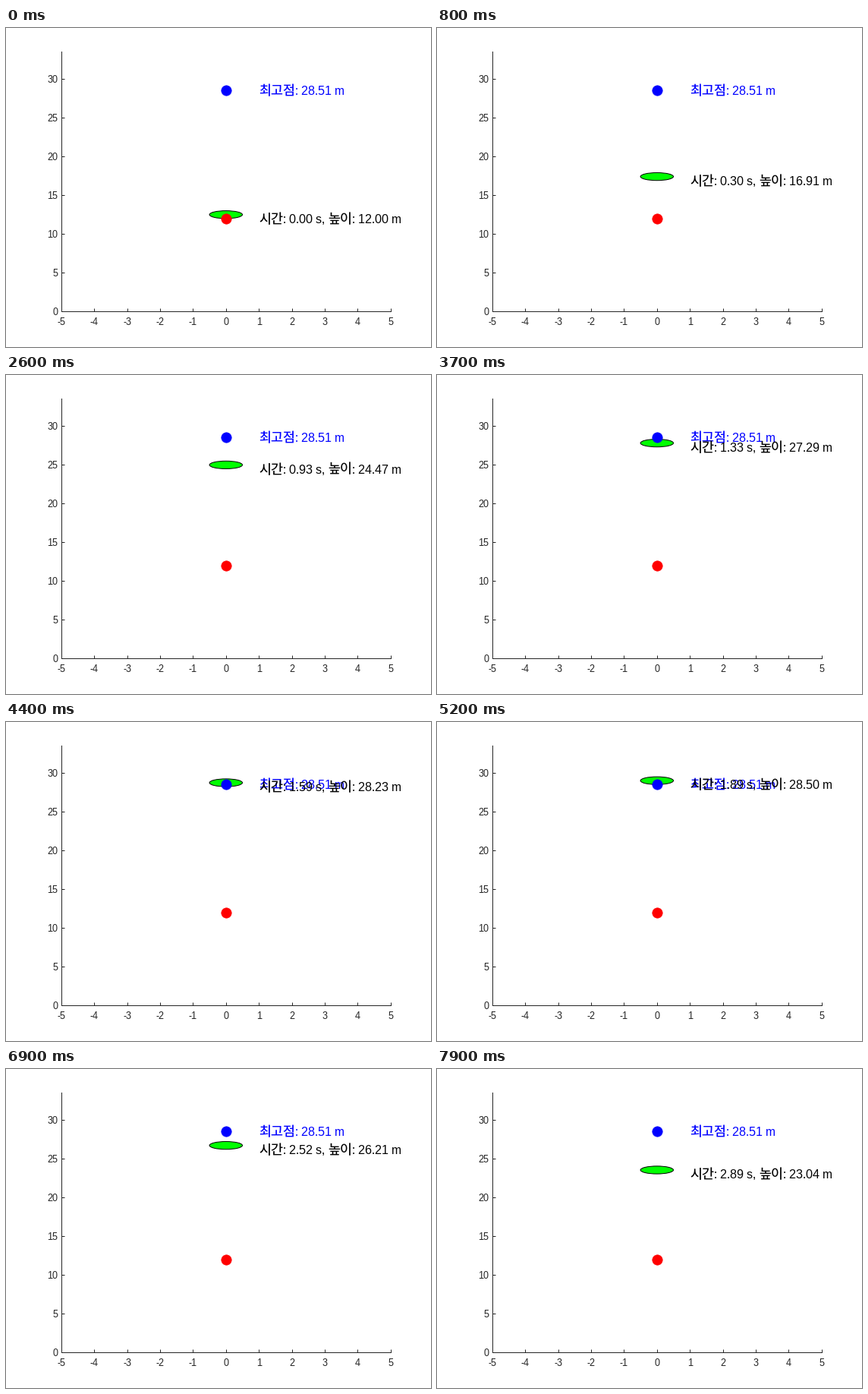
A matplotlib script that plays this animation: 560 by 420 pixels, repeating every 8000 ms.

```python
import matplotlib.pyplot as plt
from matplotlib.animation import FuncAnimation
from matplotlib.patches import Ellipse

W, H, DPI = 560, 420, 96
FRAMES, INTERVAL = 80, 100
H0, V0, G = 12, 18, 9.81
PEAK = H0 + V0**2 / (2 * G)
DT = 2 * V0 / G / 99
HOLD = 19  # one sample is shown twice here
EM = 12
LATIN = "Liberation Sans"
HANGUL = "Noto Sans CJK JP"

plt.rcParams.update({
    "font.family": LATIN,
    "font.size": 10,
    "axes.unicode_minus": False,
    "text.hinting": "default",
    "text.hinting_factor": 1,
})

fig = plt.figure(figsize=(W / DPI, H / DPI), dpi=DPI, facecolor="white")
ax = fig.add_axes([0.13, 46.6 / H, 0.775, 0.815])
ax.set(xlim=(-5, 5), ylim=(0, PEAK + 5),
       xticks=range(-5, 6), yticks=range(0, 31, 5))

ink = "#262626"
ax.spines[["top", "right"]].set_visible(False)
ax.spines[["left", "bottom"]].set(color=ink, linewidth=0.75)
ax.tick_params(direction="in", length=3.2, width=0.75, color=ink, labelcolor=ink)
ax.tick_params(axis="x", pad=5.55)
ax.tick_params(axis="y", pad=3.5)


def run(text, dx, y, color, z):
    """One piece of a label, dx points right of x = 1."""
    korean = text[0] > "\u3000"
    return ax.annotate(text, (1, y), xytext=(dx, -4.6), textcoords="offset points",
                       family=HANGUL if korean else LATIN,
                       size=13 if korean else EM,
                       color=color, zorder=z, va="baseline", annotation_clip=False)


def dot(y, color):
    ax.scatter(0, y, s=100, linewidth=0.5, color=color, zorder=4)


disc = ax.add_patch(Ellipse((0, H0 + 0.5), 1, 1, fc="lime", ec="black", lw=0.75, zorder=3))
dot(H0, "red")
dot(PEAK, "blue")

run("최고점", 0, PEAK, "blue", 5)
run(f": {PEAK:.2f} m", 3 * EM, PEAK, "blue", 5)

SECOND = 2 * EM + 44.25
clock = run(": 0.00 s,", 2 * EM, H0, "black", 6)
meter = run(": 12.00 m", SECOND + 2 * EM, H0, "black", 6)
readout = [run("시간", 0, H0, "black", 6), clock,
           run("높이", SECOND, H0, "black", 6), meter]


def update(i):
    t = DT * (i - (i >= HOLD))
    h = H0 + V0 * t - G * t**2 / 2
    disc.center = (0, h + 0.5)
    for part in readout:
        part.xy = (1, h)
    clock.set_text(f": {t:.2f} s,")
    meter.set_text(f": {h:.2f} m")
    return [disc, *readout]


anim = FuncAnimation(fig, update, frames=FRAMES, interval=INTERVAL,
                     repeat=True, repeat_delay=0)
plt.show()
```
